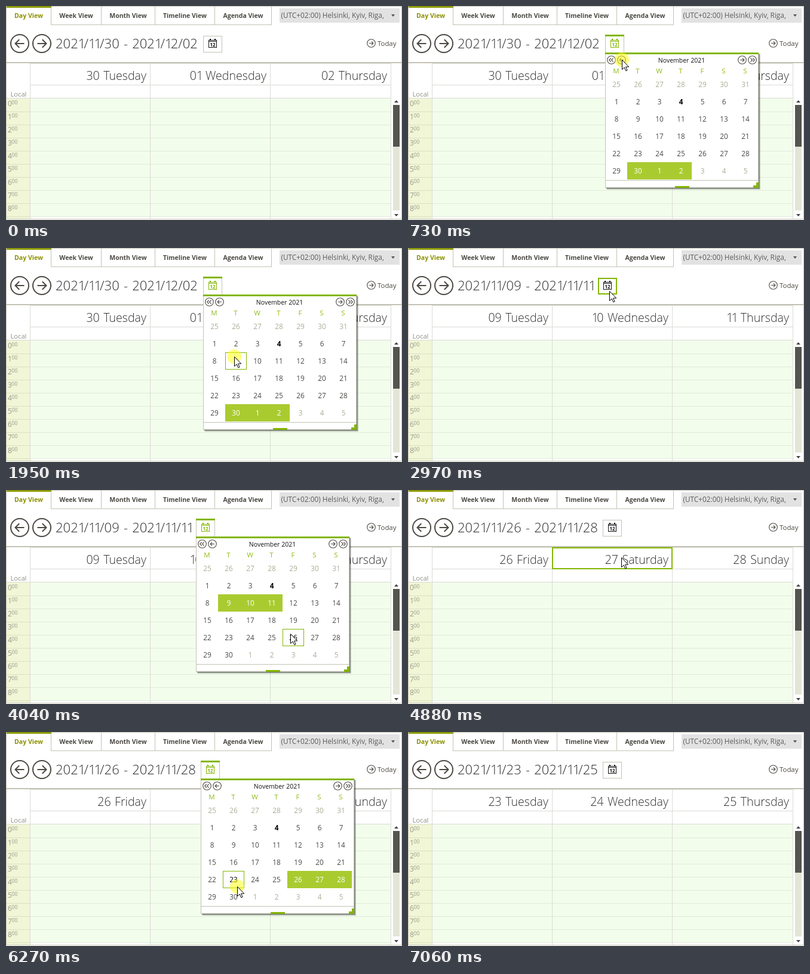
An HTML page for the animation above (7460 ms loop, 663 by 359 pixels).

```html
<!DOCTYPE html>
<html lang="en">
<head>
<meta charset="utf-8">
<title>Day view scheduler</title>
<style>
html, body { margin: 0; width: 100%; height: 100%; overflow: hidden; background: #fff; }
svg { display: block; width: 663px; height: 359px; font-family: "Open Sans", "Noto Sans", sans-serif; }
rect { shape-rendering: crispEdges; }
.light { font-weight: 300; word-spacing: 1.4px; }
.one { letter-spacing: -.135em; }
.mid { text-anchor: middle; }
.end { text-anchor: end; }
.bold { font-weight: 700; }
.stroke { fill: none; stroke: #4c4842; }
</style>
</head>
<body>
<svg viewBox="0 0 663 359"><g id="base"></g><g id="live"></g></svg>
<script>
const LOOP = 7460;
const GREEN = '#83b600', PICK = '#aacb30', EDGE = '#c3c2b4', LINE = '#dadcd5';
const COLS = [40, 241, 442, 644];
const DAYS = ['Sunday', 'Monday', 'Tuesday', 'Wednesday', 'Thursday', 'Friday', 'Saturday'];

// Shown ranges: start time, first day in November, left edge of the date button
const RANGES = [
  { at: 0, day: 30, x: 330 },
  { at: 2030, day: 9, x: 318 },
  { at: 4330, day: 26, x: 326 },
  { at: 6350, day: 23, x: 326 }
];
const OPEN = [[730, 2030], [3260, 4330], [5590, 6350]];
const CLICKS = [[650, 880], [1950, 2110], [3180, 3410], [4250, 4500], [5510, 5740], [6270, 6420]];

// Pointer legs: first step, last step, step count, end x, end y, ease-out power
const LEGS = [
  [70, 70, 1, 545, 340, 1],
  [140, 500, 6, 346, 56, 1],
  [650, 1340, 10, 378, 151, 2],
  [1420, 1650, 4, 382, 182, 1],
  [2430, 3100, 10, 335, 67, 2],
  [3180, 3880, 10, 473, 216, 2],
  [3960, 4040, 2, 476, 241, 1],
  [4730, 4880, 3, 357, 113, 1],
  [4960, 5430, 7, 342, 62, 2],
  [5510, 5820, 5, 576, 290, 1],
  [5890, 6120, 4, 387, 259, 1],
  [6670, 6980, 5, 608, 336, 1]
];
const HIDE_AT = 7060;

const rect = (x, y, w, h, fill, more = '') =>
  `<rect x="${x}" y="${y}" width="${w}" height="${h}" fill="${fill}" ${more}/>`;
const frame = (x, y, w, h, color, b = 1, fill = 'none') =>
  rect(x + b / 2, y + b / 2, w - b, h - b, fill, `stroke="${color}" stroke-width="${b}"`);
const text = (x, y, size, fill, str, cls = '') =>
  `<text x="${x}" y="${y}" font-size="${size}" fill="${fill}" class="${cls}">${str}</text>`;
const path = (d, fill) => `<path d="${d}" fill="${fill}"/>`;
const within = (list, t) => list.some(([a, b]) => t >= a && t < b);
const pad = n => String(n).padStart(2, '0');
const tightOnes = s => s.replace(/1/g, '<tspan class="one">1</tspan>');

// Round arrow button; dir is 1 for right, -1 for left
function arrow(x, y, r, w, dir) {
  const a = r * .5;
  return `<g class="stroke" stroke-width="${w}" transform="translate(${x} ${y}) scale(${dir} 1)">
    <circle r="${r}"/><path d="M${-a} 0H${a}M${a * .1} ${-a * .9}L${a} 0L${a * .1} ${a * .9}"/></g>`;
}

function doubleArrow(x, y, dir) {
  return `<g class="stroke" stroke-width="1.1" transform="translate(${x} ${y}) scale(${dir} 1)">
    <circle r="6.8"/><path d="M-3 -3L0 0L-3 3M.8 -3L3.8 0L.8 3"/></g>`;
}

function drawBase() {
  let s = rect(0, 0, 663, 359, '#fff');

  // Tabs
  const edges = [0, 75, 159, 249, 349, 444];
  ['Day', 'Week', 'Month', 'Timeline', 'Agenda'].forEach((name, i) => {
    s += rect(edges[i + 1], 0, 1, 32, EDGE);
    s += text((edges[i] + edges[i + 1] + 1) / 2, 20, 10.5, i ? '#4a4842' : '#8c9000', name + ' View', 'mid bold');
  });
  s += rect(0, 0, 663, 1, EDGE) + rect(75, 31, 370, 1, EDGE) + rect(0, 0, 76, 3, '#8c9a00');

  // Time zone list and navigation
  s += rect(458, 4, 201, 24, '#e2e2e2');
  s += text(460.5, 20, 11.8, '#5c5c5c', '(UTC+02:00) Helsinki, Kyiv, Riga,');
  s += path('M645 14h6l-3 4z', '#555');
  s += arrow(23, 63, 15, 2, -1) + arrow(60, 63, 15, 2, 1) + arrow(611.5, 62.5, 6.8, 1.1, 1);
  s += text(622, 67, 11.4, '#4c4842', 'Today');

  // Day grid
  const width = COLS[3] - COLS[0];
  s += rect(0, 94, 663, 2, EDGE);
  s += rect(1, 155, 39, 202, '#f0f6d6') + rect(41, 155, width, 202, '#f3fdec');
  s += rect(40, 96, width, 1, LINE) + rect(40, 132, width, 1, LINE) + rect(1, 154, COLS[3], 1, LINE);
  s += text(7.5, 152, 11.2, '#8f8f85', 'Local');
  for (let h = 0; h < 9; h++) {
    const y = 155 + h * 22;
    s += rect(1, y + 22, 39, 1, '#dbe0c2') + rect(41, y + 22, width, 1, '#e1eadc');
    s += text(3, y + 13, 12, '#9b9b8c', h) + text(9.5, y + 10, 8.6, '#9b9b8c', '00');
  }
  COLS.forEach(x => s += rect(x, 96, 1, 261, LINE));

  // Scroll bar
  s += rect(648, 166, 11, 177, '#e3e5d6') + rect(648, 166, 11, 70, '#555550');
  s += path('M650 162h7l-3.5 -4z', '#444') + path('M650 349h7l-3.5 4z', '#444');

  // Outer edge
  s += rect(0, 0, 1, 358, EDGE) + rect(662, 0, 1, 358, EDGE) + rect(0, 357, 663, 1, EDGE);
  return s;
}

function dateButton(x, open, hover) {
  const ink = open ? GREEN : '#111';
  let s = open
    ? rect(x, 48, 32, 30, '#fff') + rect(x, 48, 32, 3, GREEN) + rect(x, 51, 1, 27, EDGE) + rect(x + 31, 51, 1, 27, EDGE)
    : frame(x, 50, 32, 28, hover ? GREEN : EDGE, hover ? 2 : 1, '#fff');
  s += frame(x + 9, 57, 14, 13, ink) + rect(x + 9, 59, 14, 1, ink);
  s += rect(x + 11, 55, 2, 3, ink) + rect(x + 19, 55, 2, 3, ink);
  return s + text(x + 16, 68.4, 8, ink, '12', 'mid bold');
}

function popup(x, day, hoverCell) {
  let s = '';
  for (let i = 3; i > 0; i--) s += rect(x + i, 78 + i, 257, 227, '#000', 'opacity=".2"');
  s += frame(x, 78, 257, 227, EDGE, 1, '#fff') + rect(x, 78, 257, 3, GREEN);
  s += doubleArrow(x + 10.5, 90.5, -1) + arrow(x + 27.5, 90.5, 6.8, 1.1, -1);
  s += arrow(x + 229.5, 90.5, 6.8, 1.1, 1) + doubleArrow(x + 246.5, 90.5, 1);
  s += text(x + 128, 94.5, 10.5, '#111', 'November 2021', 'mid');
  [...'MTWTFSS'].forEach((c, i) => s += text(x + 18.5 + i * 36, 112.5, 11.5, '#8fbc14', c, 'mid'));

  for (let i = 0; i < 42; i++) {
    const cx = x + 1 + i % 7 * 36, cy = 117 + Math.floor(i / 7) * 29;
    const d = i - 6, inMonth = d > 0 && d < 31;
    const label = d < 1 ? d + 31 : inMonth ? d : d - 30;
    const picked = d >= day && d < day + 3;
    const hover = i === hoverCell;
    if (picked) s += rect(cx, cy, 36, 29, PICK);
    if (hover) s += frame(cx, cy, 36, 29, GREEN);
    const ink = picked ? '#fff' : !inMonth ? '#adad96' : hover || d === 4 ? '#000' : '#4a4a46';
    s += text(cx + 18, cy + 18.5, 11.8, ink, label, d === 4 ? 'mid bold' : 'mid');
  }

  s += rect(x + 1, 292, 255, 1, EDGE) + rect(x + 117, 302, 24, 3, GREEN);
  return s + rect(x + 253, 296, 4, 9, GREEN) + rect(x + 248, 301, 9, 4, GREEN);
}

function pointer(t) {
  let pos = null;
  if (t >= HIDE_AT) return pos;
  for (const [t0, t1, n, x, y, pow] of LEGS) {
    if (t < t0) break;
    const dt = n > 1 ? (t1 - t0) / (n - 1) : 1;
    const k = Math.min(n, Math.floor((t - t0 + 8) / dt) + 1);
    const p = 1 - Math.pow(1 - k / n, pow);
    const from = pos || [x, y];
    pos = [from[0] + (x - from[0]) * p, from[1] + (y - from[1]) * p];
  }
  return pos && pos.map(Math.round);
}

function drawLive(t) {
  const { day, x } = RANGES.filter(r => t >= r.at).pop();
  const open = within(OPEN, t);
  const pos = pointer(t);
  const [px, py] = pos || [-99, -99];
  const dates = [0, 1, 2].map(i => new Date(2021, 10, day + i));
  const stamp = d => `${d.getFullYear()}/${pad(d.getMonth() + 1)}/${pad(d.getDate())}`;

  let s = text(83, 71, 22.05, '#303030', tightOnes(`${stamp(dates[0])} - ${stamp(dates[2])}`), 'light');
  dates.forEach((d, i) => {
    const left = COLS[i], right = COLS[i + 1];
    const weekday = d.getDay() % 6 !== 0;
    if (weekday) s += rect(left + 1, 354, right - left - 1, 3, '#fff');
    s += text(right - 6, 124, 19.6, '#303030', tightOnes(`${pad(d.getDate())} ${DAYS[d.getDay()]}`), 'light end');
    if (!open && px >= left && px < right && py >= 96 && py < 133)
      s += frame(left, 96, right - left + 1, 37, GREEN, 2);
  });

  const onButton = px >= x && px < x + 32 && py >= 50 && py < 78;
  s += dateButton(x, open, onButton);

  if (open) {
    const col = Math.floor((px - x - 1) / 36), row = Math.floor((py - 119) / 29);
    const inside = col >= 0 && col < 7 && row >= 0 && row < 6;
    s += popup(x, day, inside ? row * 7 + col : -1);
  }

  if (pos) {
    if (within(CLICKS, t)) s += `<circle cx="${px}" cy="${py}" r="12" fill="#ff0" opacity=".5"/>`;
    s += `<path transform="translate(${px + .5} ${py + .5})" d="M0 0V16L3.7 12.5L6.3 18.3L8.6 17.3L6.1 11.6H11.2Z"
      fill="#fff" stroke="#000"/>`;
  }
  return s;
}

const live = document.getElementById('live');
document.getElementById('base').innerHTML = drawBase();
let shown = '';
function render(t) {
  const next = drawLive(t);
  if (next !== shown) live.innerHTML = shown = next;
}
const start = performance.now();
function tick() {
  render((performance.now() - start) % LOOP);
  requestAnimationFrame(tick);
}
render(0);
requestAnimationFrame(tick);
</script>
</body>
</html>
```
